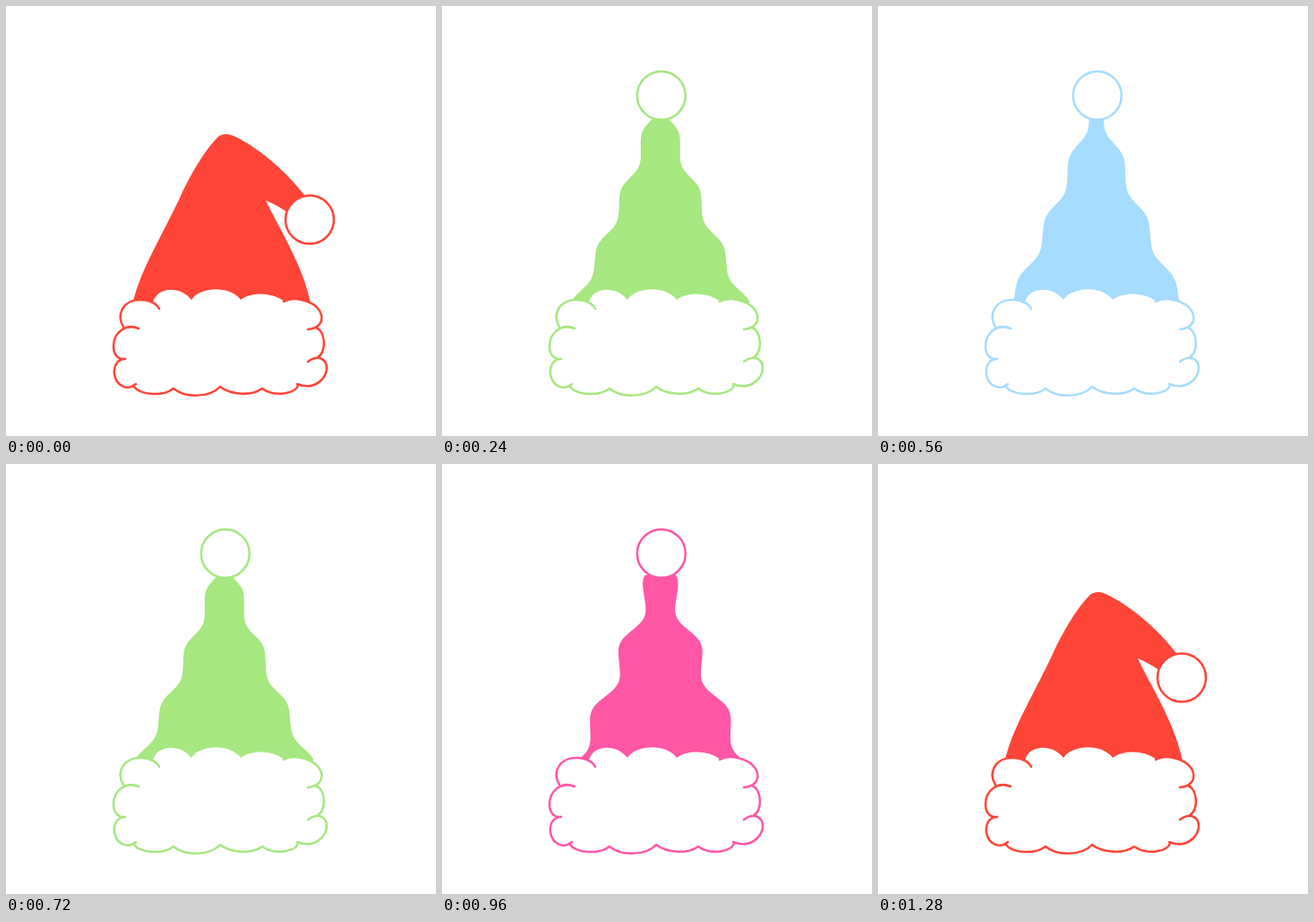
Write an HTML page that moves like this. It is 480 px wide and 480 px high and loops after 1360 ms.

```html
<!DOCTYPE html>
<html lang="en">
<head>
<meta charset="utf-8">
<title>Wobbling hat</title>
<style>
html, body { margin: 0; width: 100%; height: 100%; overflow: hidden; background: #fff; }
svg { display: block; width: 100%; height: 100%; }
</style>
</head>
<body>
<svg viewBox="0 0 480 480">
  <g id="hat" fill="#fff" stroke-width="2.5" stroke-linecap="round" stroke-linejoin="round">
    <path id="cone" stroke="none"/>
    <path stroke="none" d="M164 331 C168 313 195 312 207 328 C217 313 250 312 262 328
      C273 319 297 319 311 330 L337 361 V396 L325 423 L142 424 L133 394 L131 358Z"/>
    <path d="M131 358 C123 345 130 328 150 328 C161 328 169 333 171 338
      M148 360 C134 354 120 364 120 380 C120 390 126 395 133 394
      C124 394 120 402 121 411 C123 424 135 430 145 422
      M142 424 C150 435 175 436 187 427 C200 438 228 437 239 425
      C252 435 275 435 286 427 C300 437 324 433 326 423
      M325 422 C345 430 358 415 358 404 C358 395 349 388 337 397
      M348 392 C358 387 357 363 346 359
      M310 330 C320 324 342 328 350 340 C356 351 350 360 337 361"/>
    <circle id="pom" r="27"/>
  </g>
</svg>
<script>
const STEP = 80, LOOP = 1360;
const MID = 243.8, TOP = 124, BRIM = 331;
const hat = document.getElementById("hat");
const cone = document.getElementById("cone");
const pom = document.getElementById("pom");

// A flaring cone with a skewed ripple running down its sides
function halfWidth(y, crest, period, amp) {
  const d = y - 125, u = 2 * Math.PI * (y - crest) / period;
  return 10 + 0.33 * d + 0.0004 * d * d + amp * Math.cos(u + 0.25 * Math.cos(u));
}

function ripple(crest, period, amp) {
  const left = [], right = [];
  for (let y = TOP; y <= BRIM; y += 3) {
    const w = halfWidth(y, crest, period, amp);
    left.push([MID - w, y]);
    right.unshift([MID + w, y]);
  }
  return `M${left.concat(right).join("L")}Z`;
}

const folded = "M142 330 C150 295 175 255 195 212 C208 184 224 158 238 145 " +
  "Q246 141 254 145 C282 158 312 184 333 211 L315 231 Q304 223 290 217 " +
  "C303 245 332 290 340 332Z";

const pose = (color, d, [x, y], sx = 1, sy = 1) => ({ color, d, x, y, sx, sy });
const red = "#ff4438", up = [244.8, 100], side = [339, 238.5];
const rest = pose(red, folded, side);
const squash = pose(red, folded, side, 1.063, 0.94);
const stretch = pose(red, ripple(0, 1, 0), up, 0.94, 1.164);
const green = pose("#a6e77f", ripple(207, 63, 5), up);
const blue = pose("#a6dcff", ripple(171, 68, 5), up);
const pink = pose("#ff57a5", ripple(204, 74, 8), up);

const wobble = [green, blue, green, pink, blue, pink];
const poses = [rest, squash, stretch, ...wobble, ...wobble, squash, rest];

function draw(t) {
  const p = poses[Math.floor((t % LOOP) / STEP)];
  cone.setAttribute("d", p.d);
  cone.setAttribute("fill", p.color);
  pom.setAttribute("cx", p.x);
  pom.setAttribute("cy", p.y);
  hat.setAttribute("stroke", p.color);
  hat.setAttribute("transform",
    `translate(240 436) scale(${p.sx} ${p.sy}) translate(-240 -436)`);
}

const start = performance.now();
function tick() {
  draw(performance.now() - start);
  requestAnimationFrame(tick);
}
tick();
</script>
</body>
</html>
```
